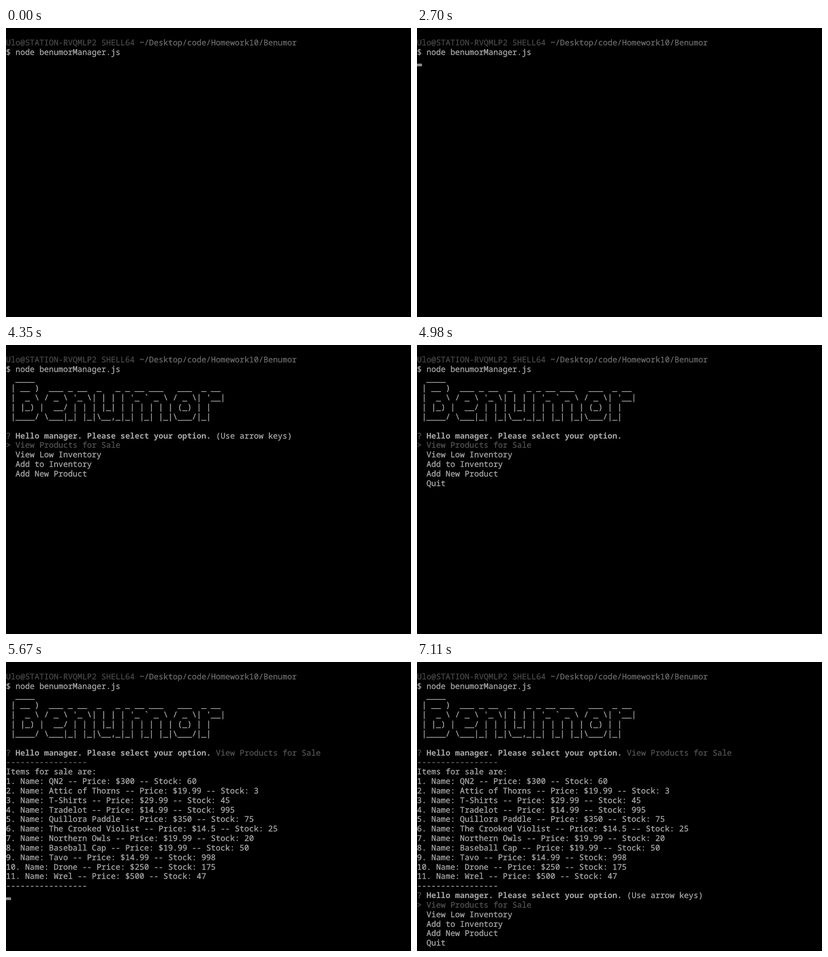
These frames come from a looping animation (885 by 633 pixels, 8 s). An HTML page:

```html
<!DOCTYPE html>
<html lang="en">
<head>
<meta charset="utf-8">
<title>Store manager terminal</title>
<style>
  html, body { margin: 0; width: 100%; height: 100%; overflow: hidden; background: #000; }
  svg { display: block; width: 885px; height: 633px; }
  text {
    font: 17.37px "Noto Sans Mono", "DejaVu Sans Mono", monospace;
    white-space: pre;
    text-rendering: geometricPrecision;
    fill: currentColor;
    stroke: currentColor;
    stroke-width: .4px;
    color: #a6a6a6;
  }
  .bold { font-weight: 700; stroke: none; }
  .path { color: #686868; }
  .dim { color: #505050; }
  .faint { color: #464646; }
  rect { fill: #8c8c8c; }
</style>
</head>
<body>
<svg id="screen" viewBox="0 0 885 633"></svg>
<script>
const LOOP = 8000, COL = 10.42, ROW = 20.83, BASE = 38;
const screen = document.getElementById("screen");

const banner = [
  "  ____",
  " | __ )  ___ _ __  _   _ _ __ ___   ___  _ __",
  " |  _ \\ / _ \\ '_ \\| | | | '_ ` _ \\ / _ \\| '__|",
  " | |_) |  __/ | | | |_| | | | | | | (_) | |",
  " |____/ \\___|_| |_|\\__,_|_| |_| |_|\\___/|_|",
];
const options = [
  "View Products for Sale", "View Low Inventory", "Add to Inventory",
  "Add New Product", "Quit",
];
const products = [
  ["QN2", "300", 60], ["Attic of Thorns", "19.99", 3], ["T-Shirts", "29.99", 45],
  ["Tradelot", "14.99", 995], ["Quillora Paddle", "350", 75],
  ["The Crooked Violist", "14.5", 25], ["Northern Owls", "19.99", 20],
  ["Baseball Cap", "19.99", 50], ["Tavo", "14.99", 998],
  ["Drone", "250", 175], ["Wrel", "500", 47],
];
const rule = "-".repeat(17);
const hint = "(Use arrow keys)";

const escape = s => s.replace(/&/g, "&amp;").replace(/</g, "&lt;").replace(/>/g, "&gt;");
const put = (row, col, text, cls = "") =>
  `<text x="${col * COL}" y="${BASE + row * ROW}" class="${cls}">${escape(text)}</text>`;
const cursor = (col, row) =>
  `<rect x="${col * COL}" y="${BASE + row * ROW - 1.6}" width="11" height="6" rx="1"/>`;

const command =
  put(0, 0, "Ulo@STATION-RVQMLP2 SHELL64", "faint") +
  put(0, 28, "~/Desktop/code/Homework10/Benumor", "path") +
  put(1, 0, "$ node benumorManager.js");
const title = command + banner.map((line, i) => put(2 + i, 0, line)).join("");

const prompt = row =>
  put(row, 0, "?", "dim") + put(row, 2, "Hello manager. Please select your option.", "bold");

// Prompt followed by the first `shown` options, with one of them selected
const menu = (row, shown, selected = 0, tail = "") =>
  prompt(row) + put(row, 44, tail) +
  options.slice(0, shown).map((name, i) => i === selected
    ? put(row + 1 + i, 0, "> " + name, "dim")
    : put(row + 1 + i, 2, name)).join("");

const answered = title + prompt(8) + put(8, 44, options[0], "dim");
const listing = answered + put(9, 0, rule, "path") + put(10, 0, "Items for sale are:") +
  products.map(([name, price, stock], i) =>
    put(11 + i, 0, `${i + 1}. Name: ${name} -- Price: $${price} -- Stock: ${stock}`)).join("") +
  put(22, 0, rule);

const steps = [
  [0, command],
  [1260, command + cursor(25, 1)],
  [1740, command],
  [1770, command + cursor(0, 2)],
  [2220, command],
  [2700, command + cursor(0, 2)],
  [2970, title],
  [3030, title + menu(8, 1, 0, hint)],
  [3060, title + menu(8, 3, 0, hint)],
  [3090, title + menu(8, 5, 0, hint)],
  // arrow down: the menu is wiped upwards and drawn again
  [4350, title + menu(8, 4, 0, hint)],
  [4380, title + menu(8, 1, 0, hint)],
  [4410, title + menu(8, 0)],
  [4470, title + menu(8, 3, 1)],
  [4500, title + menu(8, 5, 1)],
  // arrow up
  [4800, title + menu(8, 4, 1)],
  [4830, title + menu(8, 2, 1)],
  [4860, title + menu(8, 0)],
  [4890, title + menu(8, 1)],
  [4950, title + menu(8, 3)],
  [4980, title + menu(8, 5)],
  // enter
  [5610, answered],
  [5670, listing + cursor(0, 23)],
  [5790, listing],
  [6510, listing + cursor(0, 23)],
  [6990, listing + menu(23, 2, 0, hint)],
  [7110, listing + menu(23, 5, 0, hint)],
];

let current;
function draw() {
  const t = performance.now() % LOOP;
  const step = steps.findLast(([start]) => start <= t);
  if (step !== current) {
    current = step;
    screen.innerHTML = step[1];
  }
  requestAnimationFrame(draw);
}
draw();
</script>
</body>
</html>
```
